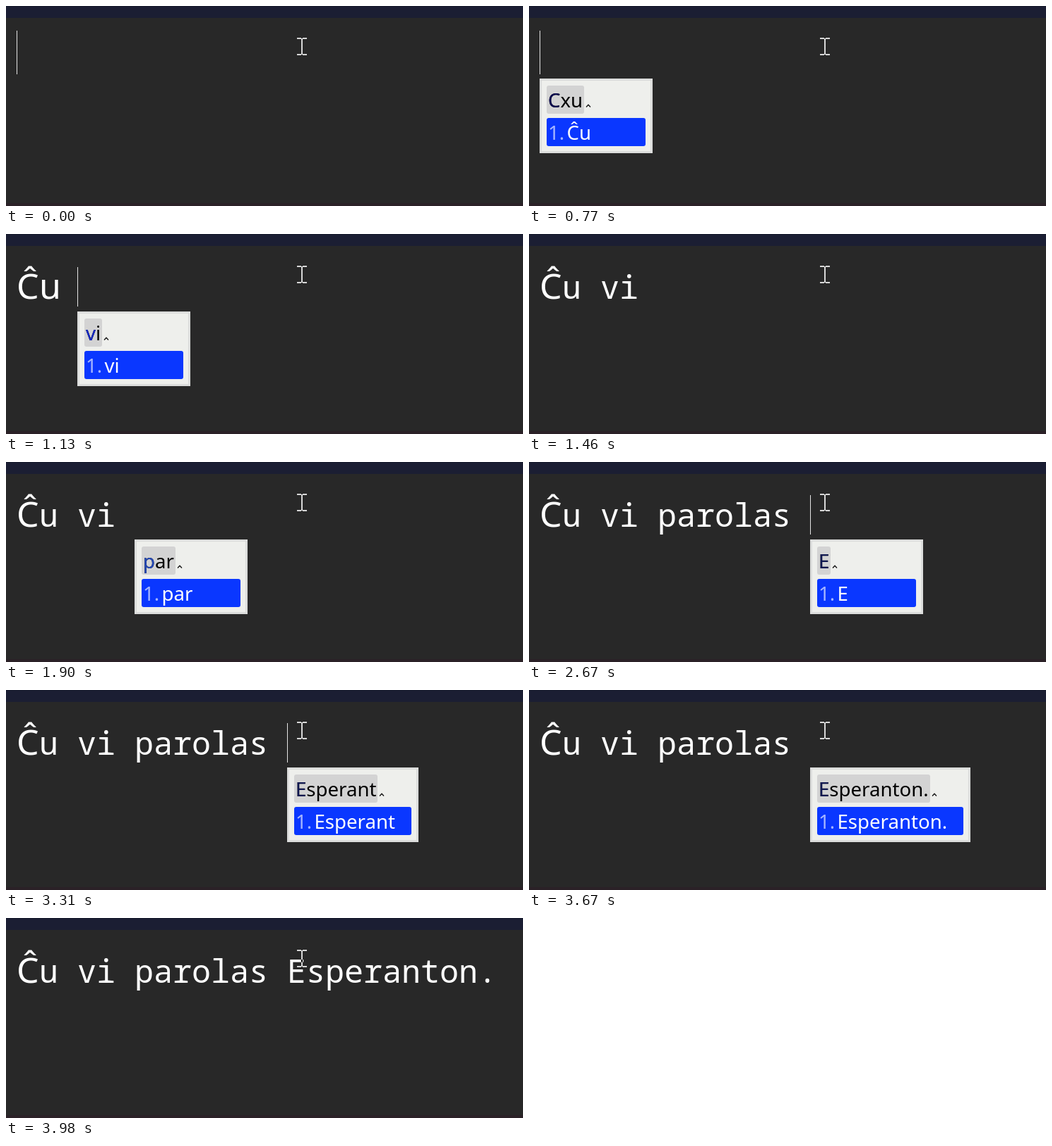
Recreate the animation shown at these times as an HTML page with a canvas. Size 732 by 284 pixels, loop 4.06 s.

```html
<!DOCTYPE html>
<html lang="eo">
<head>
<meta charset="utf-8">
<title>Input method demo</title>
<style>
  html, body { margin: 0; width: 100%; height: 100%; overflow: hidden; background: #282828; }
  canvas { display: block; }
</style>
</head>
<body>
<canvas id="stage" width="732" height="284"></canvas>
<script>
const ctx = document.getElementById('stage').getContext('2d');
const LOOP = 4060;
const BASELINE = 92;
const MONO = '45px "Noto Sans Mono", monospace';
const LARGE = '50px "Noto Sans", "Open Sans", sans-serif';
const SMALL = '27.6px "Noto Sans", "Open Sans", sans-serif';

// Insertion point before each word and after the last one.
const stops = [15, 101, 182, 398, 722];
const words = ['Ĉu', 'vi', 'parolas', 'Esperanton.'];
const initialColors = ['#0a0a50', '#1428c4', '#2448b8', '#101850'];

// Each entry: time, number of committed words, text being composed.
const steps = [
  [0, 0, ''], [200, 0, 'C'], [290, 0, 'Cx'], [510, 0, 'Cxu'],
  [960, 1, ''], [1060, 1, 'v'], [1130, 1, 'vi'],
  [1230, 2, ''], [1640, 2, 'p'], [1730, 2, 'pa'], [1900, 2, 'par'],
  [1970, 2, 'paro'], [2040, 2, 'parol'], [2100, 2, 'parola'], [2230, 2, 'parolas'],
  [2310, 3, ''], [2670, 3, 'E'], [2820, 3, 'Es'], [2880, 3, 'Esp'],
  [2960, 3, 'Espe'], [3030, 3, 'Esper'], [3100, 3, 'Espera'], [3240, 3, 'Esperan'],
  [3310, 3, 'Esperant'], [3330, 3, 'Esperanto'], [3480, 3, 'Esperanton'],
  [3640, 3, 'Esperanton.'], [3720, 4, '']
];

// The insertion caret starts visible and flips at each of these times.
const caretFlips = [460, 770, 1460, 1640, 1900, 2170, 2570, 2670, 2930, 3190, 3560, 3720, 3980];

function rect(x, y, w, h, color) {
  ctx.fillStyle = color;
  ctx.fillRect(x, y, w, h);
}

function rounded(x, y, w, h, color) {
  ctx.fillStyle = color;
  ctx.beginPath();
  ctx.roundRect(x, y, w, h, 3);
  ctx.fill();
}

function text(str, x, y, font, color) {
  ctx.font = font;
  ctx.fillStyle = color;
  ctx.fillText(str, x, y);
}

function widthOf(str) {
  ctx.font = SMALL;
  return ctx.measureText(str).width;
}

function drawBackdrop() {
  rect(0, 0, 732, 284, '#282828');
  rect(0, 0, 732, 17, '#1b1e33');
  rect(0, 0, 732, 1, '#161a2c');
  rect(0, 280, 732, 4, '#2b2127');
}

function drawCommitted(count) {
  for (let i = 0; i < count; i++) {
    if (i === 0) {
      text('Ĉ', stops[0], BASELINE, LARGE, '#fff');
      text('u', 47, BASELINE, count === 1 ? LARGE : MONO, '#fff');
    } else {
      text(words[i], stops[i], BASELINE, MONO, '#fff');
    }
  }
}

function drawPopup(word, typed) {
  const x = stops[word];
  const y = word === 0 ? 103 : 110;
  const candidate = typed.replace('Cx', 'Ĉ');
  const width = Math.max(160, Math.round(widthOf(candidate) + 71.5));
  const markEnd = x + 14 + Math.round(widthOf(typed));

  rect(x, y, width, 106, '#dcdddc');
  rect(x + 3, y + 3, width - 6, 100, '#eeefec');

  rounded(x + 10, y + 10, markEnd - x - 10, 40, '#d3d3d3');
  text(typed, x + 12, y + 41, SMALL, '#000');
  text(typed[0], x + 12, y + 41, SMALL, initialColors[word]);

  ctx.strokeStyle = '#111';
  ctx.lineWidth = 1.3;
  ctx.beginPath();
  ctx.moveTo(markEnd + 3, y + 40.5);
  ctx.lineTo(markEnd + 6, y + 37.3);
  ctx.lineTo(markEnd + 9, y + 40.5);
  ctx.stroke();

  rounded(x + 10, y + 56, width - 20, 40, '#0a37ff');
  text('1.', x + 12, y + 87, SMALL, '#a5b5ff');
  text(candidate, x + 38.5, y + 87, SMALL, '#fff');
}

function drawCaret(stop) {
  if (stop === 0) rect(15, 35, 1, 62, '#e4e4e4');
  else rect(stops[stop], 47, 1, 56, '#e4e4e4');
}

// The I-beam pointer inverts whatever lies beneath it.
function drawPointer() {
  ctx.globalCompositeOperation = 'difference';
  rect(412, 45, 6, 2, '#fff');
  rect(420, 45, 6, 2, '#fff');
  rect(418, 46, 2, 23, '#fff');
  rect(412, 68, 6, 2, '#fff');
  rect(420, 68, 6, 2, '#fff');
  ctx.globalCompositeOperation = 'source-over';
}

function draw(time) {
  const [, committed, typed] = steps.filter(step => step[0] <= time).pop();
  const caretOn = caretFlips.filter(flip => flip <= time).length % 2 === 0;

  drawBackdrop();
  drawCommitted(committed);
  if (caretOn) drawCaret(committed);
  if (typed) drawPopup(committed, typed);
  drawPointer();
}

const start = performance.now();
function tick() {
  draw((performance.now() - start) % LOOP);
  requestAnimationFrame(tick);
}
tick();
</script>
</body>
</html>
```
